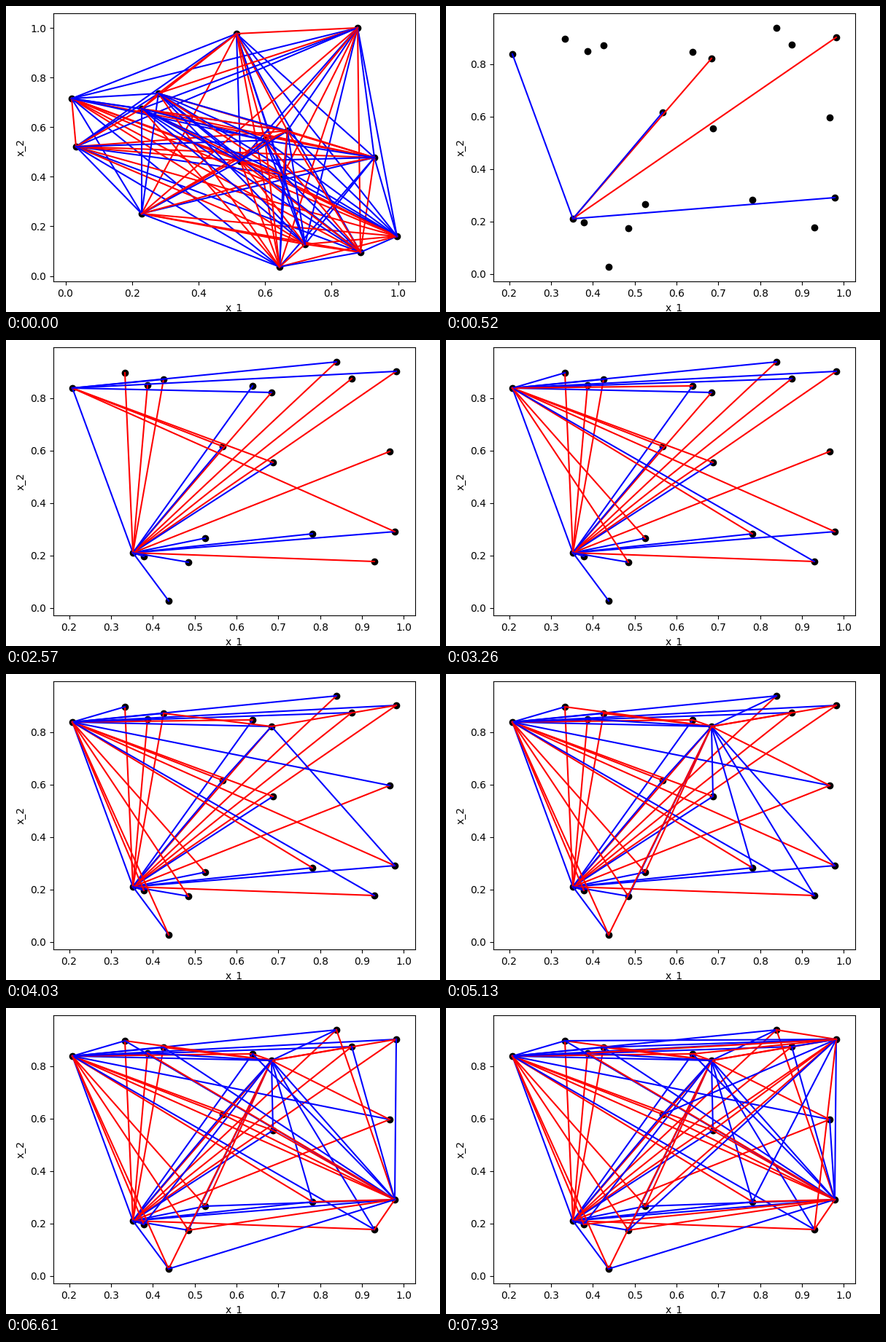
These frames come from a looping animation (595 px wide and 420 px high, 7990 ms). A matplotlib script:

```python
from itertools import combinations

import matplotlib.pyplot as plt
import numpy as np
from matplotlib.animation import FuncAnimation
from matplotlib.collections import LineCollection

W, H, DPI = 595, 420, 100
LOOP, STEP = 7990, 17
LEFT, BOTTOM, WIDTH, HEIGHT = 65, 41.6, 496, 368.6
BLUE, RED = 0, 1
COLORS = ("blue", "red")

# The new graph opens with two edges, then gains one per beat,
# resting about every fifth beat.
OPEN, FIRST, BEAT, REST = 60, 290, 77.8, 5.08


def two_color(n):
    """Color the edges of K_n one by one, keeping the expected number of
    one-colored K4 as low as possible; ties go to blue."""
    color = {}
    for edge in combinations(range(n), 2):
        risk = [0, 0]
        rest = [v for v in range(n) if v not in edge]
        for pair in combinations(rest, 2):
            sides = combinations(sorted(edge + pair), 2)
            known = [color[s] for s in sides if s in color]
            for c in (BLUE, RED):
                if all(k == c for k in known):
                    risk[c] += 2 ** len(known)
        color[edge] = RED if risk[RED] < risk[BLUE] else BLUE
    return color


class Graph:
    """Points in stage pixels with the scale that turns them into data."""

    def __init__(self, points, x_ref, y_ref):
        self.x_ref, self.y_ref = x_ref, y_ref
        px, py = np.array(points).T - 0.5
        self.xy = np.column_stack([self.x(px), self.y(py)])
        color = two_color(len(points))
        self.lines = [self.xy[list(e)] for e in color]
        self.colors = [COLORS[c] for c in color.values()]
        top = H - BOTTOM - HEIGHT - 0.5
        self.xlim = self.x(LEFT - 0.5), self.x(LEFT + WIDTH - 0.5)
        self.ylim = self.y(top + HEIGHT), self.y(top)

    def x(self, px):
        pixel, value, scale = self.x_ref
        return value + (px - pixel) / scale

    def y(self, py):
        pixel, scale = self.y_ref
        return (pixel - py) / scale


rng = np.random.default_rng(4)
inner = rng.uniform((215, 160), (390, 300), (4, 2))
outer = [(90, 127), (316, 38), (96, 193), (482, 30), (505, 208), (186, 285),
         (536, 316), (209, 120), (486, 338), (186, 141), (410, 327), (375, 358)]
old = Graph(np.vstack([outer, inner]), (81, 0, 456), (370, 340.5))
new = Graph(
    [(174, 292), (91, 66), (364, 72), (533, 263), (535, 43), (297, 146),
     (216, 54), (366, 168), (453, 30), (273, 272), (474, 53), (420, 266),
     (505, 304), (338, 63), (163, 45), (250, 305), (194, 62), (223, 358),
     (526, 153), (189, 297)],
    (86, 0.2, 573.75), (367, 359.5),
)

fig = plt.figure(figsize=(W / DPI, H / DPI), dpi=DPI, facecolor="white")
ax = fig.add_axes([LEFT / W, BOTTOM / H, WIDTH / W, HEIGHT / H])
ax.set_xlabel("x_1")
ax.set_ylabel("x_2")
dots = ax.scatter([], [], color="black")
edges = LineCollection([], linewidths=1.5, capstyle="projecting", zorder=2)
ax.add_collection(edges, autolim=False)


def edge_count(t):
    beats = max(0, int((t - FIRST) / BEAT + 1))
    return 2 + beats - int((beats + 2) / REST)


def show(graph, count):
    ax.set_xlim(graph.xlim)
    ax.set_ylim(graph.ylim)
    dots.set_offsets(graph.xy)
    edges.set_segments(graph.lines[:count])
    edges.set_color(graph.colors[:count])


def update(i):
    t = (i + 1) * STEP - 1
    if t < OPEN:
        show(old, len(old.lines))
    else:
        show(new, edge_count(t))
    return dots, edges


anim = FuncAnimation(fig, update, frames=LOOP // STEP, interval=STEP,
                     repeat=True, repeat_delay=0)
plt.show()
```
